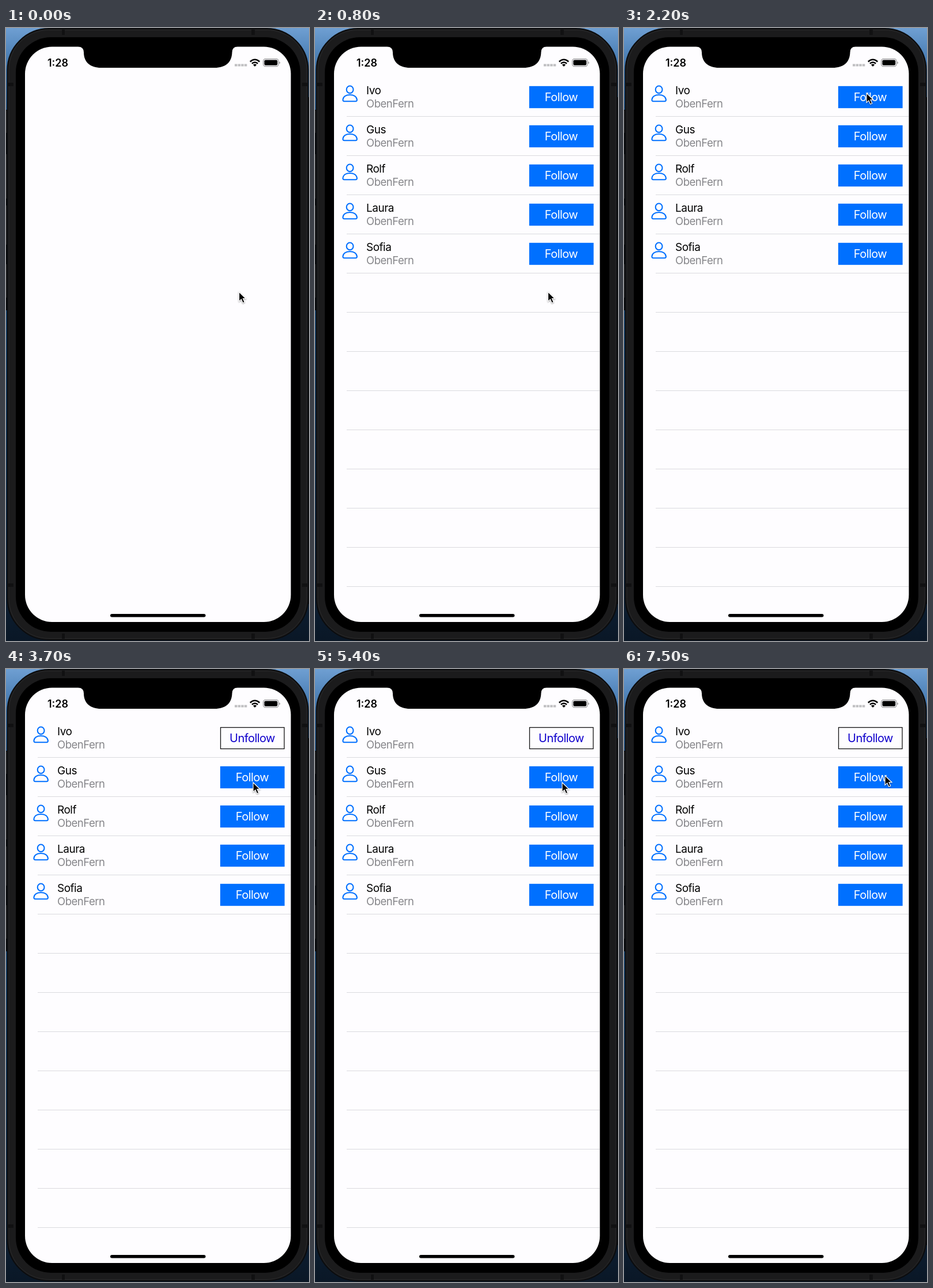
An HTML page for the animation above (7600 ms loop, 526 by 1064 pixels).

```html
<!DOCTYPE html>
<html lang="en">
<head>
<meta charset="utf-8">
<title>Follow list</title>
<style>
  html, body { margin: 0; width: 100%; height: 100%; overflow: hidden; background: #000; }
  svg { display: block; width: 526px; height: 1064px; }
  text { font-family: Inter, Roboto, sans-serif; }
  .name { font-size: 19px; letter-spacing: -.5px; }
  .sub { font-size: 18.5px; letter-spacing: -.5px; fill: #858589; }
  .label { font-size: 20px; letter-spacing: -.55px; text-anchor: middle; }
  .clock { font-size: 18px; font-weight: 600; }
</style>
</head>
<body>
<svg viewBox="0 0 526 1064">
  <defs>
    <linearGradient id="sky" x2="0" y2="1">
      <stop offset="0" stop-color="#6f9fd2"/>
      <stop offset=".07" stop-color="#3a70a8"/>
      <stop offset=".13" stop-color="#2a5d92"/>
      <stop offset=".5" stop-color="#1b4a78"/>
      <stop offset=".68" stop-color="#13385c"/>
      <stop offset="1" stop-color="#0a1726"/>
    </linearGradient>
    <g id="person" fill="none" stroke="#0070ff" stroke-width="2.1">
      <ellipse cx="60.6" cy="106.8" rx="5.9" ry="6.3"/>
      <path d="M48.4 124.5C49 119 54 116 60.6 116S72.200 119 72.900 124.500Q73 127.200 70.500 127.200H50.800Q48.300 127.200 48.400 124.500Z"/>
    </g>
  </defs>

  <!-- desktop and phone -->
  <rect width="526" height="1064" fill="url(#sky)"/>
  <path d="M0 142H4V490H0ZM523 120H526V1000H523Z" fill="#080a0d"/>
  <path d="M0 143H3V182H0ZM0 219H3V296H0ZM0 308H3V376H0ZM0 410H3V468H0Z" fill="#232325"/>
  <rect x="2.500" y="1" width="522" height="1061" rx="72" fill="#1b1b1c" stroke="#0b0c0e" stroke-width="2"/>
  <rect x="5" y="3.500" width="517" height="1056" rx="69" fill="none" stroke="#29292a"/>
  <path d="M97 3H102V12H97ZM426 3H432V12H426ZM97 1051H102V1060H97ZM426 1051H432V1060H426ZM4 95H13V101H4ZM514 95H523V101H514ZM4 964H13V970H4ZM514 964H523V970H514Z" fill="#111112"/>
  <rect x="17" y="16" width="494" height="1032" rx="61"/>
  <rect x="33" y="32.500" width="461.500" height="998.500" rx="47" fill="#fefdff"/>
  <path d="M125 32Q135 33 135 42C135 60 147 69 165 69H362C381 69 392 60 392.500 42Q392.500 33 402 32Z"/>

  <!-- status bar -->
  <text class="clock" x="72" y="66.500">1:28</text>
  <path d="M397 64.500H418.500" stroke="#bfbfc1" stroke-width="4" stroke-dasharray="4.500 1.100"/>
  <g fill="none" stroke="#000" stroke-width="2.600">
    <path d="M423.800 58.500Q432 51 440.200 58.500M426.900 61.700Q432 57.300 437.100 61.700"/>
  </g>
  <path d="M428.900 63.800Q432 61.300 435.100 63.800L432 67Z"/>
  <rect x="446.600" y="53.600" width="26.400" height="13" rx="3.800" fill="none" stroke="#98989a" stroke-width="1.200"/>
  <rect x="448.400" y="55.400" width="22.800" height="9.400" rx="2.200"/>
  <path d="M474.300 58Q476 59 476 60.200T474.300 62.400Z" fill="#98989a"/>

  <g id="list"></g>
  <rect x="181" y="1017" width="165.500" height="5.500" rx="2.700"/>
  <path id="cursor" d="M0 0V16.500L3.900 12.900 6.700 19.300 9.700 18 7 11.700H12Z" stroke="#fff" stroke-width="1.200"
    style="filter:drop-shadow(0 1px 1px #0006)"/>
</svg>

<script>
const LOOP = 7600, FRAME = 100, PITCH = 68;
const names = ["Ivo", "Gus", "Rolf", "Laura", "Sofia"];
const handle = "ObenFern";

// when each row's button flips
const taps = [[2400], [4100, 5000], [], [6100, 6600], []];

// cursor stops: time, x, y
const stops = [
  [0, 404.5, 458], [1400, 404.5, 458], [2100, 421, 113], [3000, 421, 113],
  [3300, 434, 160], [3600, 429, 197], [5400, 429, 197], [5900, 426, 328],
  [6800, 426, 328], [7400, 453, 185], [LOOP, 453, 185]
];

const list = document.getElementById("list");
const cursor = document.getElementById("cursor");

let lines = "";
for (let i = 0; i < 13; i++) lines += `M55 ${153.5 + i * PITCH}H494`;

list.innerHTML = `<path d="${lines}" stroke="#dadade"/>` + names.map((name, i) => `
  <g transform="translate(0 ${i * PITCH})">
    <use href="#person"/>
    <text class="name" x="89" y="115">${name}</text>
    <text class="sub" x="89" y="138">${handle}</text>
    <g class="button">
      <rect x="372.500" y="101.500" width="110.500" height="37" stroke-width="1.300"/>
      <text class="label" x="427.500" y="127"></text>
    </g>
  </g>`).join("");

const buttons = [...list.querySelectorAll(".button")].map(b => b.children);

function setButton([box, label], followed) {
  box.setAttribute("fill", followed ? "#fefdff" : "#0070ff");
  box.setAttribute("stroke", followed ? "#111" : "#0070ff");
  label.setAttribute("fill", followed ? "#1000cc" : "#fff");
  label.textContent = followed ? "Unfollow" : "Follow";
}

function cursorAt(t) {
  const k = stops.findIndex(s => s[0] > t);
  const [t0, x0, y0] = stops[k - 1], [t1, x1, y1] = stops[k];
  const u = (t - t0) / (t1 - t0), e = u * u * (3 - 2 * u);
  return [x0 + (x1 - x0) * e, y0 + (y1 - y0) * e];
}

function draw(now) {
  const t = Math.floor((now % LOOP) / FRAME) * FRAME;
  list.style.display = t < 600 ? "none" : "";
  buttons.forEach((b, i) => setButton(b, taps[i].filter(at => at <= t).length % 2 === 1));
  cursor.setAttribute("transform", `translate(${cursorAt(t)})`);
}

function tick() {
  draw(performance.now());
  requestAnimationFrame(tick);
}
tick();
</script>
</body>
</html>
```
